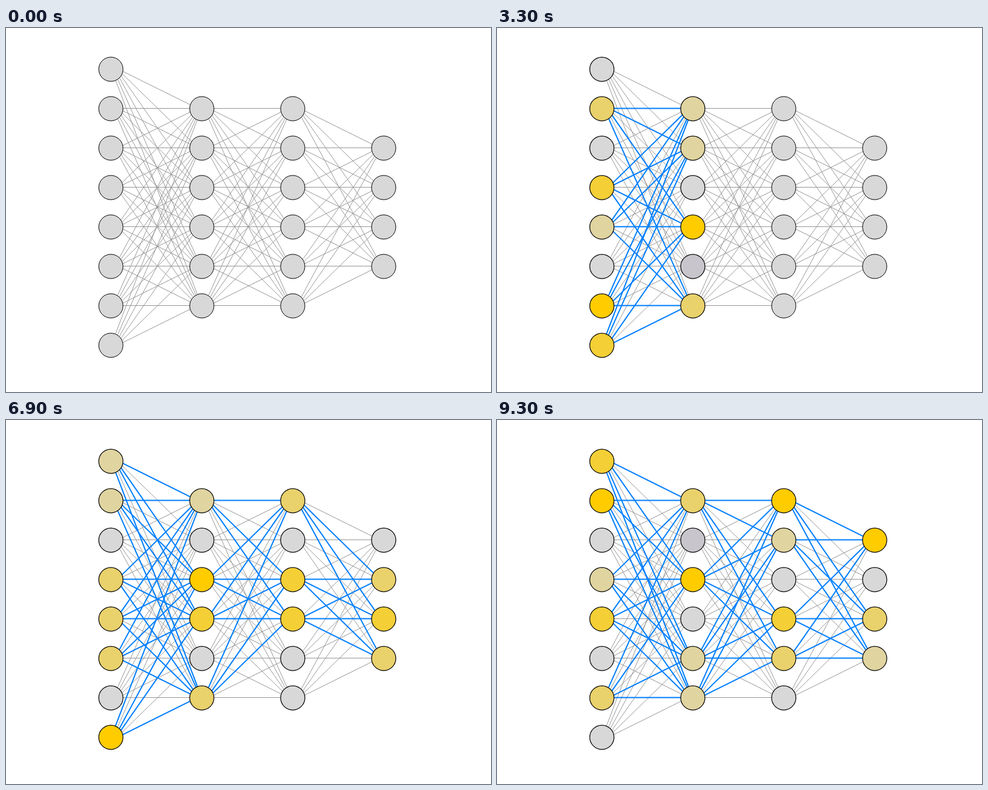
Recreate the animation shown at these times as an HTML page. Size 800 px wide and 600 px high, loop 9600 ms.

```html
<!DOCTYPE html>
<html lang="en">
<head>
<meta charset="utf-8">
<title>Neural network activation</title>
<style>
  html, body { margin: 0; width: 100%; height: 100%; overflow: hidden; background: #fff; }
  svg { display: block; width: 800px; height: 600px; }
</style>
</head>
<body>
<svg id="stage" viewBox="0 0 800 600" xmlns="http://www.w3.org/2000/svg"></svg>
<script>
const STEP = 300;
const STEPS_PER_PASS = 8;
const SIZES = [8, 6, 6, 4];
const RADIUS = 20;
const LAYER_GAP = 150;
const ROW_GAP = 65;
const PORT_ANGLE = Math.PI / 16;
const FILLS = {
  0: "#d8d8d8", 1: "#e0d4a0", 2: "#e9d16c", 3: "#f4cf36", 4: "#ffcc00", d: "#c8c6cc"
};

// One activation level per node, layer by layer; "d" is a dimmed, inactive node.
const PASSES = [
  ["40222011", "203401", "003302", "2320"],
  ["02031043", "1104d2", "023014", "1204"],
  ["11022204", "104302", "203300", "0232"],
  ["34013020", "2d4011", "410320", "4021"]
];

const stage = document.getElementById("stage");

function set(el, attrs) {
  for (const key in attrs) el.setAttribute(key, attrs[key]);
}

function add(parent, tag, attrs) {
  const el = document.createElementNS("http://www.w3.org/2000/svg", tag);
  set(el, attrs);
  return parent.appendChild(el);
}

const nodeX = layer => 173 + LAYER_GAP * layer;
const nodeY = (layer, row) => 295.5 + ROW_GAP * (row - (SIZES[layer] - 1) / 2);
const isActive = level => level > 0;

// Edges join rim to rim: the leaving angle grows evenly with the rows crossed,
// the arriving angle lies halfway to the direct line between centres.
function edgeLine(x1, y1, x2, y2) {
  const leave = PORT_ANGLE * (y2 - y1) / ROW_GAP;
  const arrive = (leave + Math.atan2(y2 - y1, x2 - x1)) / 2;
  return {
    x1: x1 + RADIUS * Math.cos(leave), y1: y1 + RADIUS * Math.sin(leave),
    x2: x2 - RADIUS * Math.cos(arrive), y2: y2 - RADIUS * Math.sin(arrive)
  };
}

const idleEdges = add(stage, "g", { stroke: "#979797", "stroke-width": 1, transform: "translate(0 -0.5)" });
const litEdges = add(stage, "g", { stroke: "#007fff", "stroke-width": 2, transform: "translate(0 -0.5)" });
const nodeGroup = add(stage, "g", { stroke: "#000" });

const edges = [];
const nodes = [];

SIZES.forEach((size, layer) => {
  for (let row = 0; row < size; row++) {
    const cx = nodeX(layer), cy = nodeY(layer, row);
    nodes.push({ layer, row, el: add(nodeGroup, "circle", { cx, cy, r: RADIUS }) });
    for (let to = 0; to < (SIZES[layer + 1] || 0); to++) {
      const line = edgeLine(cx, cy, nodeX(layer + 1), nodeY(layer + 1, to));
      add(idleEdges, "line", line);
      edges.push({ layer, row, to, el: add(litEdges, "line", line) });
    }
  }
});

// Odd steps light a layer of nodes, even steps the edges leaving it.
function draw(tick) {
  const pass = PASSES[Math.floor(tick / STEPS_PER_PASS)];
  const step = tick % STEPS_PER_PASS;
  for (const { layer, row, el } of nodes) {
    const reached = step >= 2 * layer + 1;
    set(el, { fill: FILLS[reached ? pass[layer][row] : "0"], "stroke-width": reached ? 1.25 : 1 });
  }
  for (const { layer, row, to, el } of edges) {
    const lit = step >= 2 * layer + 2 && isActive(pass[layer][row]) && isActive(pass[layer + 1][to]);
    set(el, { visibility: lit ? "visible" : "hidden" });
  }
}

const TICKS = PASSES.length * STEPS_PER_PASS;
const start = performance.now();
let shown = 0;

function frame() {
  const tick = Math.floor((performance.now() - start) / STEP) % TICKS;
  if (tick !== shown) draw(shown = tick);
  requestAnimationFrame(frame);
}

draw(0);
requestAnimationFrame(frame);
</script>
</body>
</html>
```
